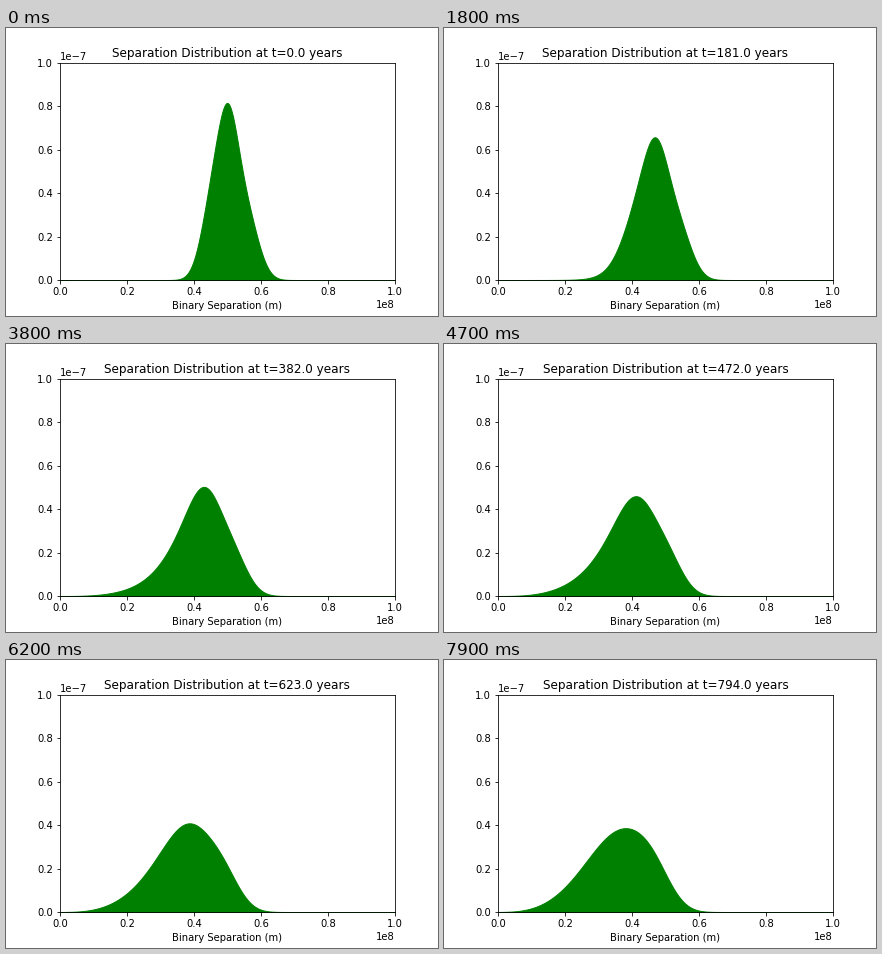
A matplotlib script that plays this animation: 432x288 px, repeating every 8 s.

```python
import numpy as np
import matplotlib.pyplot as plt
from matplotlib.animation import FuncAnimation

FRAMES = 80
INTERVAL = 100
YEARS_PER_FRAME = 2000 / 199

# Two 1.4 solar mass stars spiral in by gravitational radiation
G, C = 6.674e-11, 2.998e8
MASS = 1.4 * 1.989e30
YEAR = 3.156e7
DECAY = 256 / 5 * G**3 * 2 * MASS**3 / C**5 * YEAR  # loss of a**4 per year

BINARIES = 2000
# Initial separations: weight, mean, spread
MIX = [(0.27, 4.53e7, 3.1e6), (0.48, 5.02e7, 2.9e6), (0.25, 5.57e7, 3.4e6)]

x = np.linspace(0, 1e8, 1001)
dx = x[1]


def gauss(u, mean, sd):
    return np.exp(-((u - mean) / sd) ** 2 / 2) / (sd * np.sqrt(2 * np.pi))


def density(years):
    """Smoothed density of the binaries that have not merged yet."""
    u = (x**4 + DECAY * years + 1) ** 0.25  # separation at the start
    p = sum(w * gauss(u, m, s) for w, m, s in MIX) * (x / u) ** 3
    alive = p.sum() * dx
    p /= alive
    mean = (x * p).sum() * dx
    sd = np.sqrt(((x - mean) ** 2 * p).sum() * dx)
    width = sd * (BINARIES * alive) ** -0.2  # Scott's rule
    kernel = gauss(x, x[500], width) * dx
    return np.convolve(p, kernel, mode="same")


fig, ax = plt.subplots(figsize=(6, 4), dpi=72, facecolor="white")
fig.subplots_adjust(left=0.125, right=0.9, bottom=0.125, top=0.88)
area = ax.fill_between(x, 0 * x, color="green", lw=1)
ax.set_xlim(0, 1e8)
ax.set_ylim(0, 1e-7)
ax.set_xlabel("Binary Separation (m)")
title = ax.set_title("")


def update(frame):
    years = round(frame * YEARS_PER_FRAME)
    curve = np.column_stack([x, density(years)])
    area.set_verts([np.vstack([[0, 0], curve, [x[-1], 0]])])
    title.set_text(f"Separation Distribution at t={years:.1f} years")
    return area, title


anim = FuncAnimation(fig, update, frames=FRAMES, interval=INTERVAL,
                     init_func=lambda: update(0), repeat=True,
                     repeat_delay=0, blit=False)
plt.show()
```
